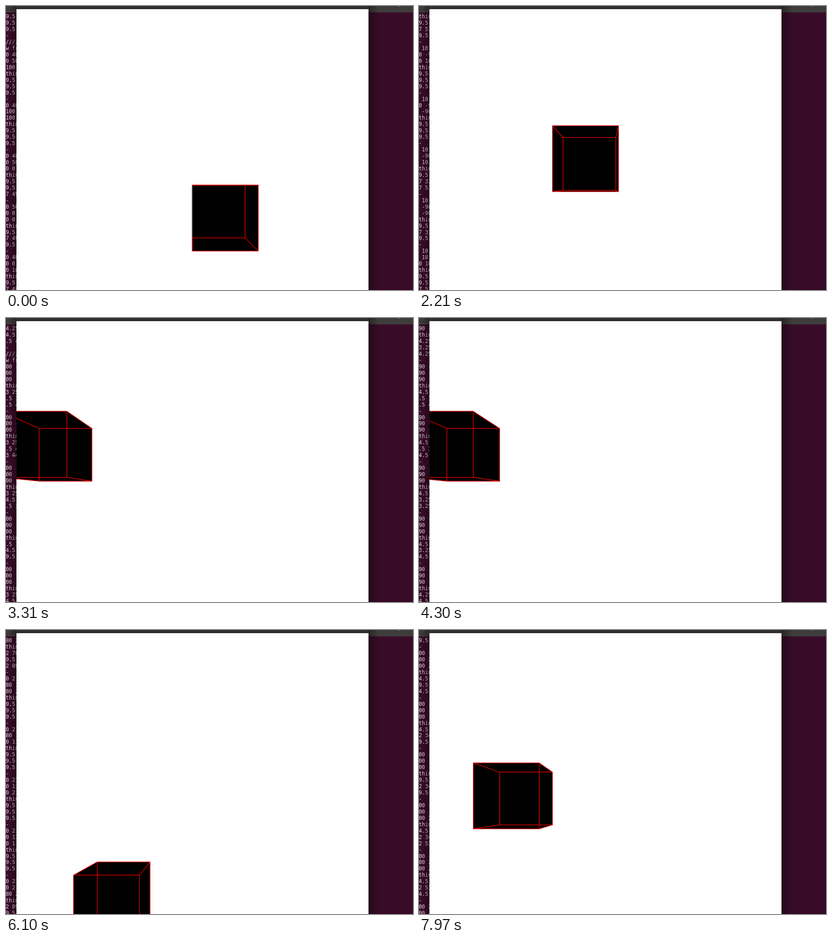
An HTML page with a canvas that plays this animation: 896 px wide and 625 px high, repeating every 8 s.

```html
<!DOCTYPE html>
<html lang="en">
<head>
<meta charset="utf-8">
<title>Moving cube</title>
<style>
  html, body { margin: 0; width: 100%; height: 100%; overflow: hidden; background: #380c28; }
  canvas { display: block; width: 896px; height: 625px; }
</style>
</head>
<body>
<canvas id="stage" width="896" height="625"></canvas>
<script>
const ctx = document.getElementById('stage').getContext('2d');

const LOOP = 8000, START = 339, TICK = 58.1;
const WINDOW = { left: 23, top: 7, right: 798, scale: 0.775 };
const ROWS = 44, ROW_HEIGHT = 13.95;

// [tick, x, y, first visible log line], positions in steps of 10 units
const PATH = [
  [-6, 0, 0, -4], [-1, 0, 0], [6, 7, 0], [16, 7, 9], [17, 7, 9], [18, 7, 8], [19, 7, 7],
  [32, -8, -9, 45], [33, -8, -9], [42, -20, -13], [51, -29, -13, -4], [52, -30, -13],
  [60, -38, -13], [70, -28, -13], [79, -18, -13], [84, -18, -7], [85, -18, -6],
  [99, -18, 10], [100, -18, 11], [105, -18, 16], [107, -20, 16],
  [131, -20, -7, 8], [132, -20, -8], [140, -20, -16]
];

// Corner number bits: 1 = right, 2 = bottom, 4 = far
const TRIANGLES = ['046', '062', '041', '415', '013', '032', '746', '745', '713', '715', '732', '276'];
const FACES = ['0132', '4576', '0154', '2376', '0264', '1375'];

function cubeAt(tick) {
  const i = Math.max(1, PATH.findIndex(p => p[0] >= tick));
  const [k0, x0, y0] = PATH[i - 1], [k1, x1, y1] = PATH[i];
  const f = (tick - k0) / (k1 - k0);
  return { x: 10 * Math.round(x0 + (x1 - x0) * f), y: 10 * Math.round(y0 + (y1 - y0) * f) };
}

function corner(cube, bits) {
  return [cube.x + (bits & 1 ? 100 : 0), cube.y + (bits & 2 ? 100 : 0), bits & 4 ? 500 : 400];
}

const project = ([x, y, z]) => [499.5 + x * 750 / z, 499.5 + y * 750 / z];

function toStage(point) {
  const [x, y] = project(point);
  return [WINDOW.left + x * WINDOW.scale, WINDOW.top + y * WINDOW.scale];
}

// The order in which the projected corners of a triangle are logged
function winding(triangle, cube) {
  if (triangle === '041' && cube.y < 0) return '014';
  return triangle === '732' ? '273' : triangle;
}

function logLines(cube) {
  const lines = ['////////', 'new frame'];
  for (const tri of TRIANGLES) {
    for (const v of tri) lines.push(corner(cube, v).join(' '));
    lines.push('nothing');
    for (const v of winding(tri, cube)) lines.push(project(corner(cube, v)).join(' '));
    lines.push('---');
  }
  return lines;
}

function rect(color, x, y, w, h) {
  ctx.fillStyle = color;
  ctx.fillRect(x, y, w, h);
}

function shadow(x0, x1, strength) {
  const g = ctx.createLinearGradient(x0, 0, x1, 0);
  g.addColorStop(0, `rgba(0,0,0,${strength})`);
  g.addColorStop(1, 'rgba(0,0,0,0)');
  rect(g, Math.min(x0, x1), 0, Math.abs(x1 - x0), 625);
}

function drawLog(tick) {
  const key = PATH.find(p => p[0] === tick && p.length > 3);
  const top = key ? key[3] : tick % 7 === 3 ? -4 : 44;
  const lines = logLines(cubeAt(tick < 0 ? tick : tick + 1));
  const before = top < 0 ? logLines(cubeAt(tick)).slice(top) : [];
  const visible = before.concat(lines.slice(Math.max(0, top))).slice(0, ROWS);
  ctx.font = '11.58px "DejaVu Sans Mono", monospace';
  ctx.fillStyle = '#d9d1d6';
  visible.forEach((line, i) => ctx.fillText(line.slice(2, 6), -0.6, 27.2 + i * ROW_HEIGHT));
}

function trace(points, closed) {
  ctx.beginPath();
  points.forEach(p => ctx.lineTo(...p));
  if (closed) ctx.closePath();
}

function drawCube(cube) {
  const points = [...Array(8).keys()].map(v => toStage(corner(cube, v)));
  const faces = FACES.map(face => [...face].map(v => points[v]));
  ctx.fillStyle = '#000';
  for (const face of faces) {
    trace(face, true);
    ctx.fill();
  }
  ctx.strokeStyle = '#f00';
  ctx.lineWidth = 1.25;
  ctx.lineJoin = 'round';
  for (const face of faces.slice(0, 2)) {
    trace(face, true);
    ctx.stroke();
  }
  for (let v = 0; v < 4; v++) {
    trace([points[v], points[v + 4]]);
    ctx.stroke();
  }
  if (cube.x === 0) {
    ctx.strokeStyle = '#4d5c5c';
    ctx.lineWidth = 1.6;
    trace([points[0], points[6]]);
    ctx.stroke();
  }
}

function drawDesktop(tick) {
  rect('#380c28', 0, 0, 896, 625);
  drawLog(tick);
  rect('#3e3d3c', 0, 0, 896, 14);
  ctx.strokeStyle = '#2c2b2b';
  ctx.lineWidth = 1;
  ctx.strokeRect(-2.5, -4.5, 18, 13);
  rect('#aaa', 864, 0, 3, 1);
  shadow(WINDOW.left, 6, 0.32);
  shadow(WINDOW.right, 822, 0.38);
}

function draw(time) {
  const tick = Math.floor((time - START) / TICK);
  drawDesktop(tick);
  const width = WINDOW.right - WINDOW.left;
  rect('#302f2f', WINDOW.left, 0, width, WINDOW.top);
  rect('#fff', WINDOW.left, WINDOW.top, width, 625);
  ctx.save();
  ctx.beginPath();
  ctx.rect(WINDOW.left, WINDOW.top, width, 625);
  ctx.clip();
  drawCube(cubeAt(tick));
  ctx.restore();
}

const origin = performance.now();
function loop() {
  draw((performance.now() - origin) % LOOP);
  requestAnimationFrame(loop);
}
loop();
</script>
</body>
</html>
```
